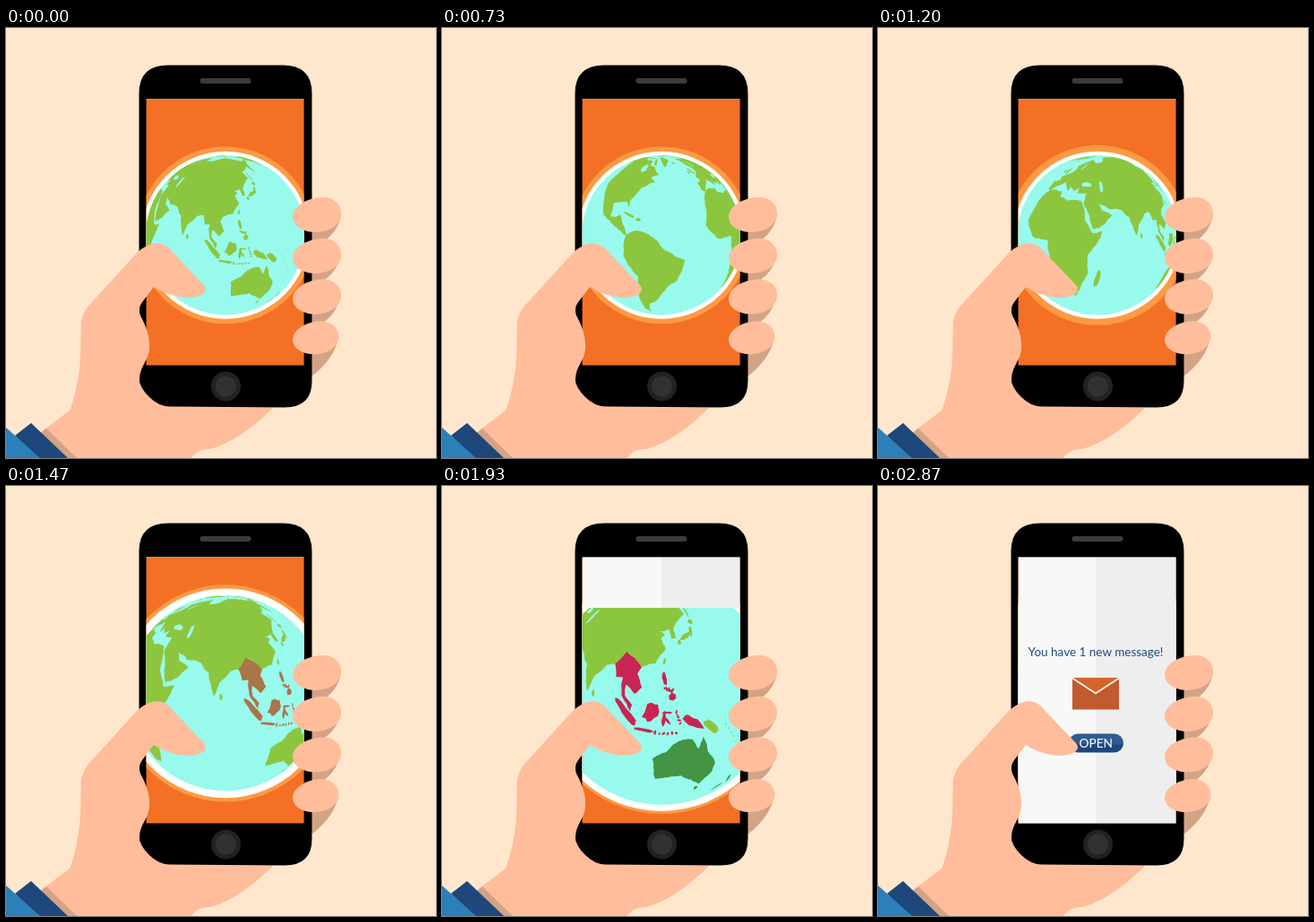
Recreate the animation shown at these times as an HTML page. Size 480x480 px, loop 2.99 s.

```html
<!DOCTYPE html>
<html lang="en">
<head>
<meta charset="utf-8">
<title>Message from around the world</title>
<style>
  html, body { margin: 0; width: 100%; height: 100%; overflow: hidden; background: #fee7cd; }
  svg { display: block; width: 100vw; height: 100vh; }
  text { font-family: Lato, "Open Sans", sans-serif; text-anchor: middle; }
  .skin { fill: #ffbd9b; }
  .shade { fill: #d3a386; }
</style>
</head>
<body>
<svg viewBox="0 0 480 480">
  <defs>
    <clipPath id="screen"><rect x="156.600" y="79.600" width="176" height="297"/></clipPath>
    <linearGradient id="pill" x2="0" y2="1">
      <stop offset=".5" stop-color="#2f5c91"/><stop offset=".62" stop-color="#1f477d"/>
    </linearGradient>
  </defs>
  <rect width="480" height="480" fill="#fee7cd"/>

  <!-- hand behind the phone -->
  <path class="shade" d="M335 195L374 208Q371 229 350 241L373 254Q369 275 350 284L373 300Q368 322 350 331L371 345Q367 369 341 389H335Z"/>
  <path class="skin" d="M42 449L80 420L150 320L302 420Q262 461 228 470Q214 469 207 480H60Z"/>

  <!-- phone -->
  <path d="M148.500 73Q148.500 41.500 181 41.500H309Q341.500 41.500 341.500 73V394Q341.500 423.500 311 423.500L182 422.500Q170 422 160 412Q148.500 401 148.500 390Z"/>
  <rect x="216.500" y="56" width="57" height="6" rx="3" fill="#3b3b3b"/>
  <circle cx="245.500" cy="400" r="16.500" fill="#222"/>
  <circle cx="245.500" cy="400" r="11.500" fill="#313131"/>

  <g clip-path="url(#screen)">
    <rect x="150" y="70" width="190" height="310" fill="#f37024"/>
    <g transform="translate(245 231.300)">
      <circle id="halo" fill="#fd9a43"/>
      <circle id="rim" fill="#fff"/>
      <circle id="sea" fill="#98faec"/>
      <path id="land" fill="#8cc63f"/>
      <path id="isles"/>
      <path id="south"/>
    </g>
    <g id="panel">
      <rect x="150" y="60" width="93" height="332" fill="#f8f8f8"/>
      <rect x="243" y="60" width="100" height="332" fill="#eee"/>
      <text x="243" y="190" font-size="13.500" fill="#1f4b7d">You have 1 new message!</text>
      <rect x="217" y="214" width="52" height="35.500" fill="#bf5b2e"/>
      <path d="M217 214H269L243 231.500Z" fill="#d4642c"/>
      <path d="M217 214.500L243 231.500L269 214.500" fill="none" stroke="#f8f4f0" stroke-width="1.800"/>
      <rect x="213" y="276.500" width="61" height="21" rx="10.500" fill="url(#pill)"/>
      <text x="243.300" y="292" font-size="13.700" fill="#fff">OPEN</text>
    </g>
  </g>

  <!-- thumb, wrist and sleeve -->
  <path class="skin" d="M42 449L70 431C76 413 82 392 83 367C84 355 83 340 84 327Q87 314 96 306L147 250Q166 234 180 244L220 286Q226 292 220 297Q209 303 193 300Q177 297 165 289L152 306Q147 313 150 321C156 332 161 344 160 359C158 373 150 377 149 391V410L110 480H60Z"/>
  <path class="shade" d="M45 447L79 480H64L37 453Z"/>
  <path d="M10 455L28 441L69 480H36Z" fill="#1e477c"/>
  <path d="M0 446L38 480H0Z" fill="#2b80b9"/>

  <!-- fingers -->
  <g class="skin">
    <path id="finger" d="M320 210C321 197 340 188 356 189C369 190 375 200 374 209C372 222 358 228 344 228C330 227 320 221 320 210Z"/>
    <use href="#finger" y="46"/>
    <use href="#finger" y="91.500"/>
    <use href="#finger" transform="translate(16 148.800) scale(.95 .945)"/>
  </g>
</svg>
<script>
const LOOP = 2990, STEP = 200 / 3;
const RAD = Math.PI / 180, TILT = 11 * RAD, STRETCH = 1.15;
const $ = id => document.getElementById(id);

let seed = 7;
const random = () => (seed = seed * 16807 % 2147483647) / 2147483647;

// Rugged coast: split each edge in half, pushing the middle sideways.
function edge([x, y], [u, v]) {
  const d = Math.hypot(u - x, v - y);
  if (d < 2) return [[x, y]];
  const push = (random() - .5) * .16;
  const mid = [(x + u) / 2 - (v - y) * push, Math.min(78, (y + v) / 2 + (u - x) * push)];
  return [...edge([x, y], mid), ...edge(mid, [u, v])];
}

// Clockwise continent from a few "lon,lat" corners.
function coast(text) {
  const pts = text.split(" ").map(p => p.split(",").map(Number));
  return pts.flatMap((p, i) => edge(p, pts[(i + 1) % pts.length]));
}

// Ragged oval; it runs counter-clockwise, so inside a continent it cuts a lake.
function blob(lon, lat, long, wide = long, turn = 0) {
  const c = Math.cos(turn * RAD), s = Math.sin(turn * RAD);
  return Array.from({ length: 14 }, (_, i) => {
    const a = i / 7 * Math.PI, k = .8 + .4 * random();
    const x = long * k * Math.cos(a), y = wide * k * Math.sin(a);
    return [lon + x * c - y * s, lat + x * s + y * c];
  });
}

// Row of small islands between two places.
function chain(x, y, u, v, count, size) {
  return Array.from({ length: count }, (_, i) => {
    const k = i / (count - 1), off = (random() - .5) * size;
    return blob(x + (u - x) * k, y + (v - y) * k + off, size * (.6 + random()), size * .6, random() * 180);
  });
}

const land = [
  // Eurasia with its inland seas
  coast("-9,37 -9,43 -1,45 -4,48 8,54 9,58 5,60 13,66 25,71 41,66 68,69 104,77 140,73 190,66 163,61 157,52 155,59 136,55 140,48 128,40 129,35 126,35 125,40 118,39 122,37 119,35 122,30 116,23 108,21 98,20 92,22 87,21 80,15 77,8 73,20 67,25 57,26 48,30 51,25 59,22 52,16 44,13 35,29 36,37 27,37 28,41 23,38 13,45 18,40 16,38 9,44 0,40 -5,36"),
  blob(51, 42, 5, 1.8, 100), blob(35, 43.5, 5.5, 1.8), blob(20, 60, 5, 1.5, 60),
  // Africa
  coast("-6,36 10,37 11,33 20,31 33,31 38,18 43,11 51,12 40,-3 40,-15 33,-26 27,-34 19,-34 12,-17 9,4 -8,5 -17,14 -13,27"),
  blob(47, -19, 7, 2, 72),
  // North America
  coast("-167,65 -156,71 -128,70 -95,69 -82,67 -78,62 -65,60 -56,52 -66,50 -60,46 -74,41 -81,31 -80,25 -84,30 -97,28 -96,19 -91,19 -87,21 -83,15 -79,8 -95,16 -105,20 -114,31 -110,23 -124,40 -124,48 -140,60 -152,59 -165,54 -158,59"),
  blob(-85, 58, 6, 4, -20), blob(-72, 68, 9, 2.5, -35), blob(-110, 72, 7, 2), blob(-79, 76, 9, 1.5),
  coast("-45,60 -54,70 -68,76 -30,78 -22,70"),
  blob(-79, 21.5, 5, .8, -15), blob(-71, 19, 2.2, .9),
  // South America
  coast("-79,9 -72,12 -62,10 -50,0 -35,-7 -40,-21 -48,-26 -57,-38 -65,-42 -68,-55 -74,-50 -71,-18 -81,-5"),
  // northern and Pacific islands
  blob(-2, 54, 4, 1.6, 105), blob(-8, 53, 1.8), blob(-19, 65, 4, 1),
  blob(136, 36, 4.5, 1.2, 25), blob(140.5, 38.5, 3, 1, 75), blob(143, 43.5, 2, 1.3), blob(143, 50, 4, .7, 95),
  blob(131, 33, 1.2), blob(121, 24, 1.6, .7, 70), blob(81, 7.5, 1.5, .9, 90), blob(146, -6.5, 5, 2, -35),
  ...chain(-160, 22, -155, 19, 4, .5), ...chain(178, -17, 212, -17, 9, .6), ...chain(155, -6, 168, -20, 7, .6)
];

// Southeast Asia
const isles = [
  coast("92,22 94,16 98,16 98,8 103,1 104,4 100,8 100,13 105,9 109,12 106,18 108,21 98,28"),
  blob(101, 0, 8, 1.7, -46), blob(110, -7.3, 5, .8, -8), blob(114, 1, 5, 3.6, 45),
  blob(120.5, -2, 3.5, .9, 80), blob(122.5, .8, 2.5, .5), blob(122.5, -3, 2, .6, -50),
  blob(121, 16, 3, 1.2, 100), blob(125, 8, 2, 1.6), blob(136, -4, 6, 2, -28),
  ...chain(121, 12, 125, 10.5, 5, .9), ...chain(116, -8.5, 127, -9, 6, .9), ...chain(127, 1, 129, -4, 5, .8)
];

// Australia and New Zealand
const south = [
  coast("114,-22 115,-34 124,-33 132,-32 138,-35 147,-39 153,-31 153,-26 146,-19 142,-11 140,-17 136,-12 131,-12 126,-14 122,-18"),
  blob(146.5, -42, 1.5), blob(176, -38.5, 3.5, 1.2, -50), blob(170, -44, 4, 1.2, 42)
];

const shapes = [[$("land"), land], [$("isles"), isles], [$("south"), south]];

// Orthographic view; hidden corners slide to the edge of the disc.
function project(ring, lon, r) {
  let seen = false;
  const pts = ring.map(([a, b]) => {
    const l = (a - lon) * RAD, p = b * STRETCH * RAD;
    const x = Math.cos(p) * Math.sin(l), depth = Math.cos(p) * Math.cos(l);
    const y = Math.cos(TILT) * Math.sin(p) - Math.sin(TILT) * depth;
    const front = Math.sin(TILT) * Math.sin(p) + Math.cos(TILT) * depth > 0;
    seen = seen || front;
    const k = front ? r : r / (Math.hypot(x, y) || 1);
    return (x * k).toFixed(2) + " " + (-y * k).toFixed(2);
  });
  return seen ? "M" + pts.join("L") + "Z" : "";
}

const clamp = x => Math.min(1, Math.max(0, x));
const ramp = (t, a, b) => {
  const x = clamp((t - a) / (b - a));
  return x * x * (3 - 2 * x);
};
const mix = (a, b, k) => `rgb(${a.map((v, i) => Math.round(v + (b[i] - v) * k))})`;

const GREEN = [140, 198, 63], RED = [201, 36, 83], DARK = [68, 146, 68];

function draw(t) {
  const grow = ramp(t, 1190, 1640), more = ramp(t, 1700, 2130);
  const r = 89 + 30 * grow + 10 * more;
  $("sea").setAttribute("r", r);
  $("rim").setAttribute("r", 93.5 + 35 * grow + 5.5 * more);
  $("halo").setAttribute("r", 99 + 30.3 * ramp(t, 1130, 1640) + 9.7 * more);

  const lon = 110 + 163 * ramp(t, 0, 1000) + 207 * ramp(t, 0, 2000);
  for (const [path, rings] of shapes)
    path.setAttribute("d", rings.map(ring => project(ring, lon, r)).join(""));
  $("isles").setAttribute("fill", mix(GREEN, RED, ramp(t, 1330, 1600)));
  $("south").setAttribute("fill", mix(GREEN, DARK, ramp(t, 1720, 1950)));

  const rise = 312 * (1 - clamp((t - 1870) / 800)) ** 2.4;
  $("panel").setAttribute("transform", `translate(${Math.min(2, rise / 43)} ${-rise})`);
}

const begin = performance.now();
function tick() {
  const t = (performance.now() - begin) % LOOP;
  draw(Math.floor((t + 5) / STEP) * STEP);
  requestAnimationFrame(tick);
}
tick();
</script>
</body>
</html>
```
